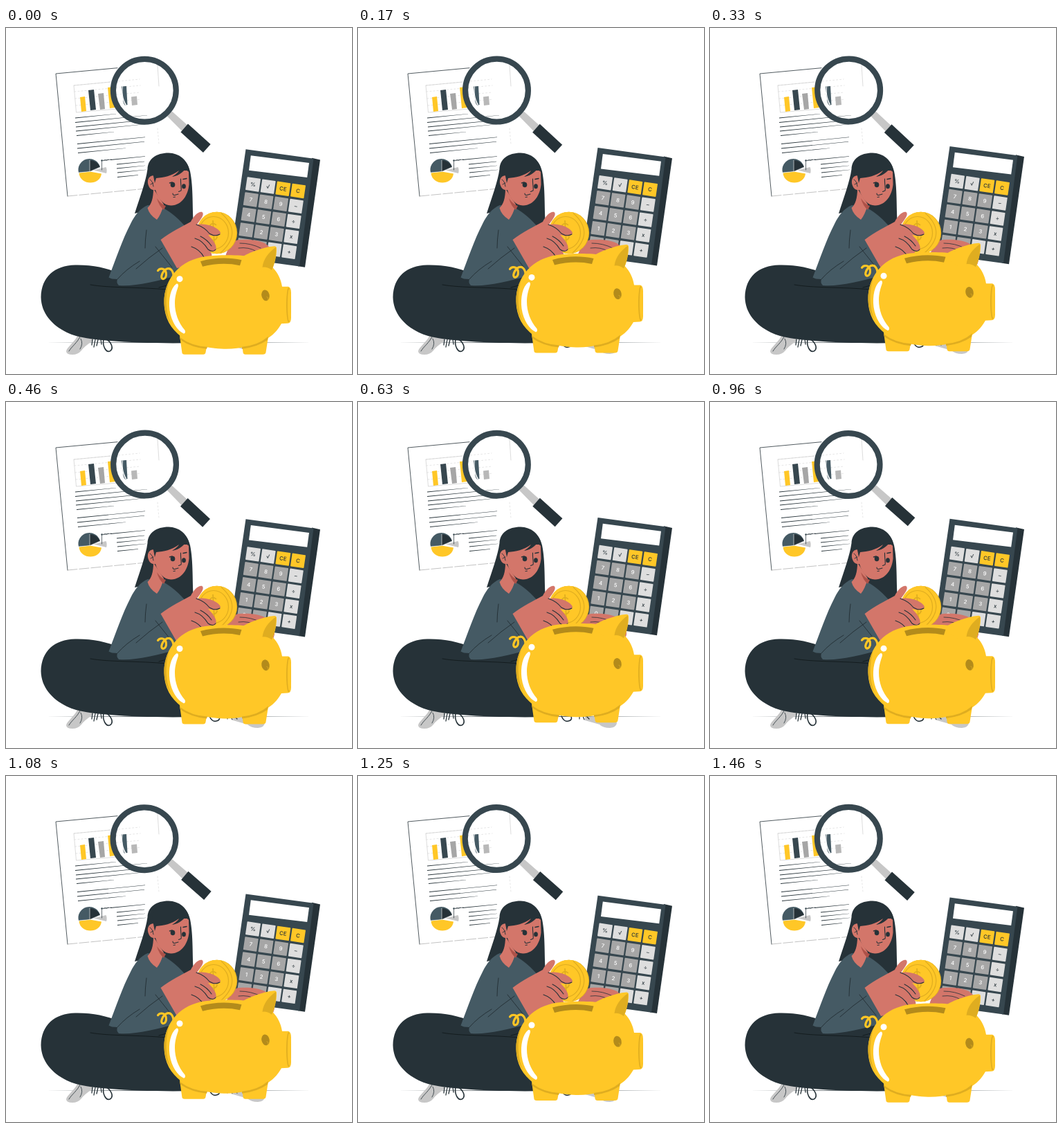
Write an HTML page that moves like this. It is 500 by 500 pixels and loops after 1.5 s.

```html
<!DOCTYPE html>
<html lang="en">
<head>
<meta charset="utf-8">
<title>Saving money</title>
<style>
html, body { margin: 0; width: 100%; height: 100%; overflow: hidden; background: #fff; }
svg { display: block; width: 100vw; height: 100vh; }
.ink { fill: #263238; }
.slate { fill: #37474f; }
.wool { fill: #455a64; }
.skin { fill: #d3766a; }
.gold { fill: #ffc727; }
.amber { fill: #dfad20; }
.brown { fill: #b38b1b; }
.grey { fill: #a6a6a6; }
.pale { fill: #c7c7c7; }
.white { fill: #fff; }
.line { fill: none; stroke: #263238; stroke-width: 1; stroke-linecap: round; stroke-linejoin: round; }
.key { font: 500 7.8px Inter, sans-serif; text-anchor: middle; }
</style>
</head>
<body>
<svg viewBox="0 0 500 500">
  <path class="ink" d="M58 454.500L250 454.100L441 454.500L250 454.900Z"/>

  <g id="page">
    <path class="white" d="M72 66L218 52L235 229L89 243Z"/>
    <path class="line" style="stroke-width:.8" d="M161 57.700L72 66L89 243"/>
    <path class="line" style="stroke-width:.6;stroke:#999" d="M89 243L198 232.500" stroke-dasharray="14 3"/>
    <path class="line" style="stroke-width:.6;stroke:#c4c4c4" d="M219 54L221 84M151 78L98 83L101.500 122L160 117"/>
    <path class="line" style="stroke-width:.5;stroke:#ccc" stroke-dasharray="2 3" d="M98 83L193 74M99 92L194 83M100 102L194 93M101 112L195 103M219 145L221 168"/>
    <g id="text" class="ink"></g>
    <path class="gold" d="M107 100L114 99L116 120L109 121Z"/>
    <path class="slate" d="M119 90L127 89L130 118L122 119Z"/>
    <path class="grey" d="M133 95L141 94L143 117L136 118Z"/>
    <path class="gold" d="M147 86L155 85L158 115L150 116Z"/>
    <path class="wool" d="M167 84.500L174 84L175.500 111L170 112Z"/>
    <path class="grey" d="M181 99.500L189 98.500L190 111L182 112Z" style="fill:#b8b8b8"/>
    <path class="wool" d="M121 207.500L105 209A16 16 0 0 1 136 201Z"/>
    <path class="ink" d="M121 207.500V191A16 16 0 0 1 136 201Z"/>
    <path class="gold" d="M121 207.500L105.500 209.500C107 228 136 228 138 210.500Z"/>
    <path class="pale" d="M126.500 205.500L144.500 201Q146.500 205 145 210Z"/>
    <path class="line" style="stroke:#fff;stroke-width:.6" d="M105 209L121 207.500L136 201M121 207.500V191"/>
    <path class="line" style="stroke-width:.7" d="M138.500 205V191.500L152 190M141 191.800q2 -2 3 -.8t4 -1"/>
    <circle class="slate" cx="138.500" cy="191.500" r="1.200"/>
  </g>

  <g id="glass">
    <path class="pale" d="M232.500 127L240 120.500L263 141L255 149.500Z"/>
    <path class="ink" d="M263 138.500L295.700 168L285 180L252.500 150.500Z"/>
    <circle cx="200.300" cy="90.300" r="45.400" fill="none" stroke="#37474f" stroke-width="8.200"/>
    <path class="white" d="M165 82C163 93 167 105 172.500 113L169 114C162 104 161 92 164 82ZM169.500 82C167 92 169 103 174 111L172.500 112C167.500 103 166.500 92 168.500 82Z"/>
  </g>

  <g id="calc">
    <path class="ink" d="M442 188L454 190.800L432 346L422 344.500Z"/>
    <path class="slate" d="M346.500 175.700L444.500 189L424 344.800L324 331Z"/>
    <path class="white" d="M353.800 184.500L438 195.400L435.200 216.300L351 206Z"/>
    <g id="keys" transform="translate(357 226.300) rotate(8.300)"></g>
  </g>

  <g id="girl">
    <path class="ink" d="M235 180.500C217 180.500 205 189 204.500 204C202 222 194 243 186 268L204 264L225 264L258 290L271 282C269 262 271 231 266 207C262 190 250 181 235 180.500Z"/>

    <path class="pale" d="M104 443C101 452 88 461 87 467Q87 472 96 472Q104 472 109 466C114 459 121 456 126 451L124 446Z"/>
    <path class="line" style="stroke-width:.8" d="M107 446C103 455 95 460 91 467M108 449Q112 456 107 464"/>
    <path class="line" style="stroke-width:1.300" d="M125 450L124 458M129 450L127 461M133 450L131 459M137 450L138 457"/>
    <path class="line" style="stroke-width:1.600" d="M141 449C139 461 145 469 150 467C156 464 153 454 144 449"/>
    <path class="pale" d="M328 455L352 454Q366 461 374 463Q374 470 364 471Q354 471 349 466L328 460Z"/>
    <path class="line" style="stroke-width:1.600" d="M294 454Q298 463 304 461Q310 460 308 454"/>
    <path class="line" style="stroke-width:1.200" d="M320 454V458M325 454L327 459M330 454L334 458"/>

    <path class="ink" d="M50.500 389C51 360 70 343 100 342.500C124 342 146 347 160 353L260 362L275 455C230 456 185 455 150 452C128 450 104 448 88 440C66 429 51 412 50.500 389Z"/>
    <path class="line" style="stroke:#101719;stroke-width:.8" d="M122 371C150 376 190 374 232 378M221 375L236 371"/>

    <path class="wool" d="M205 256C193 261 186 271 180 283C168 306 158 336 148.500 360.500Q152 363 161 363Q159 368 163 372C186 374 216 366 244 359L262 342L262 290C250 276 240 267 227 260Z"/>
    <path class="line" d="M203 292Q201 307 201 318M188 348Q207 331 226 318M161 363Q173 349 193 337M216 316L240 346"/>
    <path class="skin" d="M213 232C213 246 210 255 204.500 260Q207 270 218 277Q224 270 228 255Z"/>
    <path d="M218 246Q224 255 231 257L228 263Q221 257 218 246Z" fill="#ad5148"/>

    <path class="skin" d="M214 213C205 213 203 222 206.500 229Q209 235 216 234C220 248 229 257 239 256.500C254 256 263 242 264.500 226L264 206L228 206Z"/>
    <path class="line" style="stroke-width:.9" d="M208 219Q212 221 213 229M209 226L213 224"/>
    <path class="ink" d="M213 214C208 198 218 184 237 183C255 185 264 194 265.500 209L259 204C253 211 247 214 240 215C246 211 249 208 250 206C239 214 228 216 217 217L215 224Z"/>
    <ellipse class="ink" cx="241" cy="226.500" rx="3.300" ry="3.800"/>
    <ellipse class="ink" cx="257" cy="228.800" rx="2.900" ry="3.500"/>
    <path class="line" style="stroke-width:1.400" d="M236.500 224L240 222.800M256 218.500L261 217.500"/>
    <path class="line" style="stroke-width:1.100" d="M252.500 218C252 225 254 232 253 235L249.500 236.500M241 239Q241 242 244 241.500L249 240M242 244.500L244.500 244"/>

    <path class="skin" d="M317 330C321 316 329 306 337 306C349 305 365 306 374 311C382 316 389 327 388 336Q386 347 377 347L340 345Z"/>
    <path class="line" style="stroke-width:.8" d="M338 311Q354 311 368 318M336 318Q351 316 362 323"/>
  </g>

  <g id="coin">
    <ellipse class="amber" cx="305" cy="296" rx="29.200" ry="30.200"/>
    <ellipse class="gold" cx="304.200" cy="296" rx="29" ry="30.200"/>
    <path d="M311 267.500Q343 296 310 325" fill="none" stroke="#dfad20" stroke-width="1.200"/>
    <ellipse cx="300" cy="296" rx="21.500" ry="23.500" fill="none" stroke="#dfad20" stroke-width="1.200"/>
    <path d="M304 285C299 280 292 284 296 290C300 295 306 295 305 302C304 307 297 308 294 304M299 278L301 312" fill="none" stroke="#dfad20" stroke-width="1.700"/>
    <path class="skin" d="M223.500 306C238 295 254 287 267 280C271 272 278 264.500 283.500 266Q287 269 281 277L276 284C290 282 307 288 310 296C308 302 299 301 292 299C299 306 306 315 303 321Q300 325 294 321C299 327 299 333 291 333L272 342L247 347Z"/>
    <path class="line" style="stroke-width:1.100" d="M275 284Q287 288 294 297Q302 302 309 298M273 304Q284 307 292 320Q299 325 303 320M268 316Q280 320 286 331M281 301Q291 306 297 315"/>
  </g>

  <g id="pig">
    <path d="M242 363C243 352 238 346 232 348.500C226 352 222 362 227 363C233 362 233 350 226.500 348.500Q222 347.500 219.500 351" fill="none" stroke="#dfad20" stroke-width="3.200" stroke-linecap="round"/>
    <path d="M242 363C243 352 238 346 232 348.500C226 352 222 362 227 363C233 362 233 350 226.500 348.500Q222 347.500 219.500 351" fill="none" stroke="#ffc727" stroke-width="2.600" stroke-linecap="round"/>
    <path class="gold" d="M250 438L254.500 470Q255 472 258 472L285 472Q288 472 288.500 469L291 455ZM341 455L342.500 469Q343 472 346 472L371 472Q375 472 375.500 469L380 440Z"/>
    <path class="gold" d="M228.500 398C228 360 254 335 288 330.500C308 328 338 328 355 331C381 336 396 353 399 374L408 374Q412 375 412 383V419Q412 427 407 427L398 427.500C392 438 385 445 376 450C360 459 338 464.500 315 464C266 463 229 440 228.500 398Z"/>
    <path class="amber" d="M251 447Q268 460 291 461L290 464Q268 462 252 451ZM341 461Q364 459 379 446L378 451Q364 461 341 464Z"/>
    <path class="amber" d="M228.500 398C228 386 231 375 236 366C229 388 231 414 239 428C232 419 229 409 228.500 398Z"/>
    <ellipse class="amber" cx="408.300" cy="400.500" rx="3.200" ry="25"/>
    <ellipse class="gold" cx="409.200" cy="400.500" rx="2.400" ry="23.500"/>
    <path class="gold" d="M336 334C350 325 371 317 388 315.500Q391 315.500 391 319C391 331 388 341 384 351L360 350Z"/>
    <path class="amber" d="M370.500 346C372 334 379 325 390 317C391 330 388 341 384 350Q377 345 370.500 346Z"/>
    <path class="brown" d="M281 337.500C300 332 322 331.500 340.500 335.500L338 343.500C320 339.500 302 340.500 284 345Z"/>
    <ellipse class="brown" cx="375" cy="386.700" rx="5.700" ry="8" transform="rotate(-12 375 386.700)"/>
    <path d="M376.500 389Q380 389 378 394" fill="none" stroke="#dfad20" stroke-width=".8"/>
    <circle class="white" cx="251" cy="363" r="4.500"/>
    <path class="white" d="M246 370C238 376 234.500 392 236.500 408C239 425 248 438 257 442Q260 441 258.500 437C249 426 244 412 244 398C244 387 247 380 249 373Q249 369 246 370Z"/>
  </g>
</svg>
<script>
const NS = "http://www.w3.org/2000/svg";
const $ = id => document.getElementById(id);

function add(parent, tag, attrs, text) {
  const el = document.createElementNS(NS, tag);
  for (const k in attrs) el.setAttribute(k, attrs[k]);
  if (text) el.textContent = text;
  parent.appendChild(el);
}

// Tapered lines of writing on the page: left x, left y, length
const rules = [
  [100, 130, 59], [100, 136.5, 104], [101, 143, 103], [101, 149, 101], [102, 155.5, 54],
  [103, 167.5, 98], [103, 174, 97], [104, 180.5, 69],
  [151, 190.5, 50], [160, 197, 40], [160, 203, 41], [161, 209, 41], [161, 215.5, 30]
];
for (const [x, y, w] of rules)
  add($("text"), "path", { d: `M${x} ${y - .5}l${w} ${.3 - w * .1}v.4l${-w} ${.3 + w * .1}z` });

const rows = [["%", "√", "CE", "C"], ["7", "8", "9", "–"], ["4", "5", "6", "÷"], ["1", "2", "3", "x"], ["0", ".", "=", "+"]];
rows.forEach((row, j) => row.forEach((label, i) => {
  const x = i * 21.9, y = j * 22.2;
  const gold = j === 0 && i > 1;
  const light = j === 0 || i === 3 || label === "=";
  add($("keys"), "rect", { x: x - 9.8, y: y - 9.5, width: 19.6, height: 19, rx: .8,
    fill: gold ? "#ffc727" : light ? "#dedede" : "#a6a6a6" });
  add($("keys"), "text", { x, y: y + 2.8, class: "key", fill: light ? "#263238" : "#fff" }, label);
}));

const LOOP = 1500;
const tri = p => 1 - Math.abs(2 * p - 1);

function draw(ms) {
  const p = ((ms + 25) % LOOP) / LOOP;
  const lift = `translate(0 ${-10 * tri(p)})`;
  $("calc").setAttribute("transform", lift);
  $("pig").setAttribute("transform", lift);
  // Sways one degree each way, starting upright
  const sway = 2 * tri((p + .25) % 1) - 1;
  $("glass").setAttribute("transform", `rotate(${sway} 223 110)`);
}

let start;
function tick(now) {
  start ??= now;
  draw(now - start);
  requestAnimationFrame(tick);
}
draw(0);
requestAnimationFrame(tick);
</script>
</body>
</html>
```
